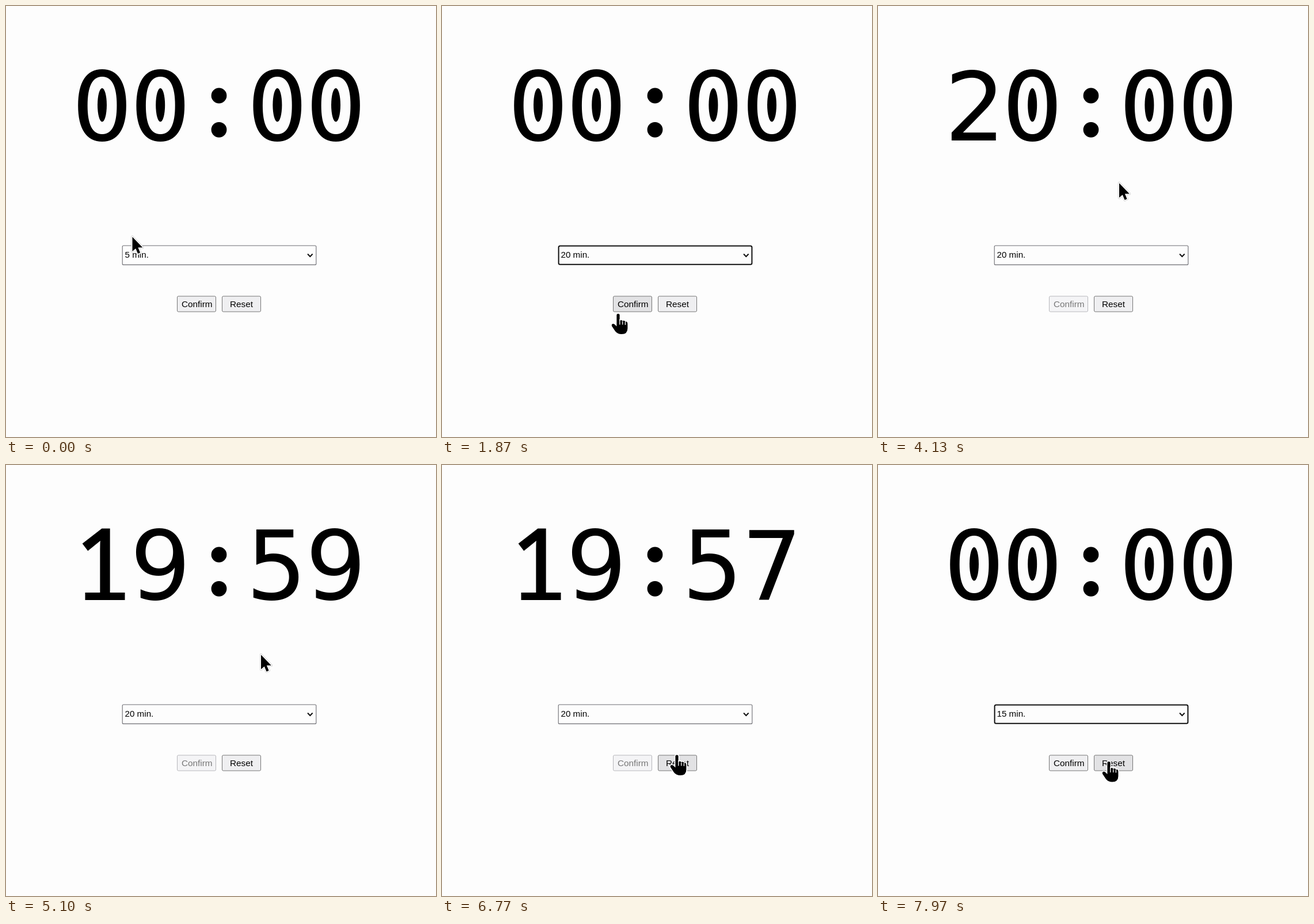
An HTML page that plays this animation: 747 by 750 pixels, repeating every 8000 ms.

```html
<!DOCTYPE html>
<html lang="en">
<head>
<meta charset="utf-8">
<title>Countdown timer</title>
<style>
  html, body { margin: 0; width: 100%; height: 100%; overflow: hidden; background: #fdfdfd; }
  svg { display: block; width: 747px; height: 750px; }
  text { font: 15.2px "Liberation Sans", Arial, sans-serif; }
  #digits text { font: 166px "DejaVu Sans", sans-serif; text-anchor: middle; }
  #digits text.one { font: 168px "Open Sans", sans-serif; stroke: #000; stroke-width: 4px; }
  .button text { font-size: 15.33px; text-anchor: middle; }
  .button rect { fill: #efeff1; stroke: #767676; }
  .button.hover rect { fill: #e2e2e4; }
  .button.off rect { fill: #f4f4f6; stroke: #b8b8bc; }
  .button.off text { fill: #777; }
</style>
</head>
<body>
<svg viewBox="0 0 747 750">
  <defs>
    <clipPath id="round"><rect x="203" y="451" width="334.5" height="162.5" rx="7"/></clipPath>
    <clipPath id="below"><rect y="450.5" width="747" height="300"/></clipPath>
    <filter id="soft" x="-30%" y="-50%" width="160%" height="200%"><feGaussianBlur stdDeviation="22"/></filter>
    <filter id="tight" x="-10%" y="-10%" width="120%" height="120%"><feGaussianBlur stdDeviation="4"/></filter>
    <path id="tip" d="M1 2.2 V27.6 L6.8 22.4 L10.6 31.4 L14.6 29.7 L10.9 20.8 H18.8 Z"/>
  </defs>
  <rect width="747" height="750" fill="#fdfdfd"/>

  <g id="digits"></g>
  <circle cx="370" cy="156" r="13.4"/>
  <circle cx="370" cy="215.3" r="13.4"/>

  <rect id="box" fill="#fdfdfd"/>
  <text id="value" x="206.5" y="437.9"></text>
  <path d="M524 431.5 L528.3 436 L532.6 431.5" fill="none" stroke="#111" stroke-width="2"/>

  <g class="button" id="confirm">
    <rect x="297.5" y="505" width="67" height="27" rx="2"/><text x="331.8" y="523.6">Confirm</text>
  </g>
  <g class="button" id="reset">
    <rect x="375.5" y="505" width="67" height="27" rx="2"/><text x="409" y="523.6">Reset</text>
  </g>

  <g id="popup">
    <g clip-path="url(#below)">
      <rect x="203" y="480" width="334.5" height="162" rx="8" fill="#0a0a30" opacity=".24" filter="url(#soft)"/>
      <rect x="203" y="453" width="334.5" height="163" rx="8" opacity=".2" filter="url(#tight)"/>
    </g>
    <rect x="203" y="451" width="334.5" height="162.5" rx="7" fill="#fdfdfd" stroke="#aaa" stroke-width=".8"/>
    <rect id="mark" x="203" width="334.5" height="27" fill="#1967d2" clip-path="url(#round)"/>
    <g id="items"></g>
  </g>

  <g id="cursor" stroke-linejoin="round">
    <g id="arrow">
      <use href="#tip" stroke="#ccc" stroke-width="4.4"/>
      <use href="#tip" stroke="#fff" stroke-width="3"/>
      <use href="#tip"/>
    </g>
    <g id="hand">
      <path stroke="#fff" stroke-width="3" paint-order="stroke" d="M-2.6 2 Q-2.6 -.5 0 -.5 Q2.6 -.5 2.6 2 V12
        Q3.2 10.3 5.2 10.4 Q7.6 10.5 7.6 13 Q8.4 11.4 10 11.6 Q12.2 12 12.3 14 Q13 13 14.5 13.2 Q16.4 13.8 16.4 17
        V25 Q16.4 35 6 35 Q-1 35 -5 30 L-11 21 Q-12 18.4 -10 17.2 Q-7.4 16.3 -4.8 19.3 L-2.6 21.6 Z"/>
      <path d="M2.8 9 V18.5 M7.7 13 V18.5 M12.4 14 V19" fill="none" stroke="#fff" stroke-width="1.3"/>
    </g>
  </g>
</svg>
<script>
const LOOP = 8000;
const $ = id => document.getElementById(id);
const NS = "http://www.w3.org/2000/svg";

function add(parent, tag, attrs, label = "") {
  const el = document.createElementNS(NS, tag);
  for (const k in attrs) el.setAttribute(k, attrs[k]);
  el.textContent = label;
  return parent.appendChild(el);
}
const set = (el, attrs) => { for (const k in attrs) el.setAttribute(k, attrs[k]); };
const show = (el, on) => el.setAttribute("visibility", on ? "visible" : "hidden");

// time, x, y of the pointer tip
const path = [
  [0, 218.5, 399.5], [500, 251, 435], [1000, 251, 435], [1400, 268, 545], [1600, 268, 545],
  [1720, 297, 547], [1870, 306, 536], [2080, 326, 524], [3180, 326, 524], [3370, 350, 470],
  [3750, 418, 306], [4300, 418, 306], [4900, 442, 328], [6350, 442, 328], [6690, 408, 505],
  [6820, 408, 505], [7080, 430, 428], [7220, 430, 428], [7520, 412, 520], [7680, 410, 520],
  [7970, 401, 516.5], [LOOP, 401, 516.5]
];

function pointer(t) {
  const i = path.findIndex((p, k) => k && t <= p[0]);
  const [t0, x0, y0] = path[i - 1], [t1, x1, y1] = path[i];
  const u = (t - t0) / (t1 - t0), e = u * u * (3 - 2 * u);
  return [x0 + (x1 - x0) * e, y0 + (y1 - y0) * e];
}

// last value whose start time has passed
const at = (steps, t) => steps.filter(s => s[0] <= t).pop()[1];
const clock = [[0, "0000"], [3300, "2000"], [4310, "1959"], [5320, "1958"], [6330, "1957"], [6800, "0000"]];
const chosen = [[0, 0], [1560, 3], [7640, 2]];
const opened = [[0, false], [640, true], [1560, false], [7110, true], [7640, false]];
const focused = [[0, false], [1560, true], [2300, false], [7640, true]];
const disabled = [[0, false], [2300, true], [6800, false]];

const names = [5, 10, 15, 20, 25, 30].map(n => n + " min.");
const items = names.map((s, i) => add($("items"), "text", { x: 208, y: 469.2 + 27 * i }, s));

// monospaced look: a dot inside each zero, a foot under each one
const nudge = { 1: 1, 2: 1.5, 5: -1.5 };
const cells = [167, 268.2, 471.4, 573].map(x => ({
  x,
  glyph: add($("digits"), "text", {}),
  dot: add($("digits"), "ellipse", { cx: x, cy: 172.3, rx: 8, ry: 29.3 }),
  foot: add($("digits"), "rect", { x: x - 29.5, y: 222, width: 69, height: 13 })
}));

function draw(t) {
  const [x, y] = pointer(t);
  const open = at(opened, t), pick = at(chosen, t), focus = at(focused, t), off = at(disabled, t);

  const time = at(clock, t);
  cells.forEach((c, i) => {
    const d = time[i], one = d === "1";
    c.glyph.textContent = d;
    set(c.glyph, { x: c.x + (nudge[d] || 0), y: one ? 233 : 234.3, class: one ? "one" : "" });
    show(c.dot, d === "0");
    show(c.foot, one);
  });

  $("value").textContent = names[pick];
  set($("box"), focus
    ? { x: 202.6, y: 417.6, width: 335.8, height: 32.2, stroke: "#101010", "stroke-width": 2, rx: 2.5 }
    : { x: 202.2, y: 417, width: 336.6, height: 33.4, stroke: open ? "#555" : "#6c6c72", "stroke-width": 1.1, rx: 2 });

  const onRow = open && y >= 451 && y < 613;
  const row = onRow ? Math.floor((y - 451) / 27) : pick;
  show($("popup"), open);
  $("mark").setAttribute("y", 451 + 27 * row);
  items.forEach((el, i) => el.setAttribute("fill", i === row ? "#fff" : "#000"));

  const onButtons = !open && y > 503 && y < 548;
  const onConfirm = onButtons && x > 296 && x < 366;
  const onReset = onButtons && x > 374 && x < 444;
  $("confirm").setAttribute("class", "button" + (off ? " off" : onConfirm ? " hover" : ""));
  $("reset").setAttribute("class", "button" + (onReset ? " hover" : ""));

  const hand = onRow || onConfirm || onReset || (y > 416 && y < 452);
  show($("hand"), hand);
  show($("arrow"), !hand);
  $("cursor").setAttribute("transform", `translate(${x.toFixed(2)} ${y.toFixed(2)})`);
}

const start = performance.now();
function tick() {
  draw((performance.now() - start) % LOOP);
  requestAnimationFrame(tick);
}
draw(0);
requestAnimationFrame(tick);
</script>
</body>
</html>
```
